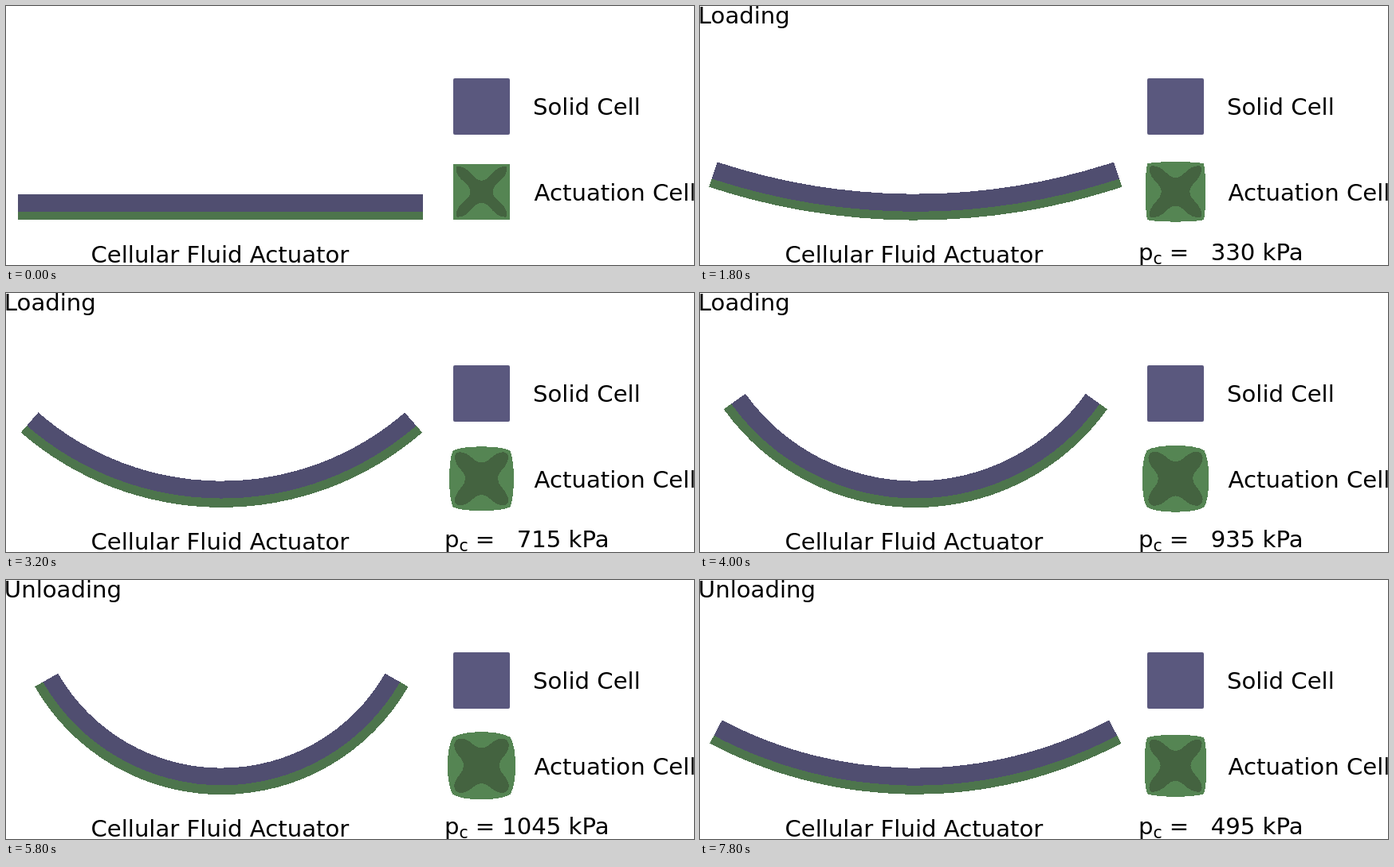
Write an HTML page that moves like this. It is 863 px wide and 326 px high and loops after 8000 ms.

```html
<!DOCTYPE html>
<html lang="en">
<head>
<meta charset="utf-8">
<title>Cellular Fluid Actuator</title>
<style>
  html, body { margin: 0; width: 100%; height: 100%; overflow: hidden; background: #fff; }
  svg { display: block; width: 863px; height: 326px; }
  path { shape-rendering: crispEdges; }
  text { font: 29.17px "DejaVu Sans", sans-serif; fill: #000; white-space: pre; }
  .sub { font-size: 20.4px; }
</style>
</head>
<body>
<svg viewBox="0 0 863 326">
  <path id="lower" fill="#4d754c"/>
  <path id="upper" fill="#504e70"/>
  <rect x="561" y="91" width="71" height="71" rx="2" fill="#5a587e"/>
  <g transform="translate(596.5 233.8)">
    <path id="cell" fill="#558553"/>
    <path id="cavity" fill="#446340"/>
  </g>
  <text id="phase" x="-2.2" y="22"></text>
  <text x="661" y="137">Solid Cell</text>
  <text x="662.6" y="245">Actuation Cell</text>
  <text x="106.4" y="322.5">Cellular Fluid Actuator</text>
  <g id="gauge">
    <text x="550" y="320">p</text>
    <text class="sub" x="568.5" y="325">c</text>
    <text x="588.8" y="320">=</text>
    <text id="value" x="696.4" y="320" text-anchor="end"></text>
    <text x="705.6" y="320">kPa</text>
  </g>
</svg>
<script>
const LOOP = 8000, STEP = 200, RISE = 55, PEAK = 1170;
const START = 600, TOP = 5000, RELEASE = 5400;
const TOP_Y = 236.6;

// pressure in kPa, half angle of the arc, half length of its inner edge
const BEND = [
  [0, 0, 254], [330, 0.3205, 253.1], [495, 0.4865, 252.5], [715, 0.7171, 250.8],
  [825, 0.8332, 249.8], [935, 0.9502, 249.2], [1170, 1.1663, 247.5]
];

const el = id => document.getElementById(id);
const draw = (id, d) => el(id).setAttribute('d', d);
const pt = (x, y) => x.toFixed(2) + ' ' + y.toFixed(2) + ' ';

function stateAt(t) {
  if (t < START) return { p: 0, phase: '', gauge: false };
  if (t < TOP) return { p: RISE * Math.floor((t - START) / STEP), phase: 'Loading', gauge: true };
  if (t < RELEASE) return { p: PEAK, phase: '', gauge: true };
  return { p: 1155 - RISE * Math.floor((t - RELEASE) / STEP), phase: 'Unloading', gauge: true };
}

function bendAt(p) {
  const i = Math.max(1, BEND.findIndex(row => row[0] >= p));
  const a = BEND[i - 1], b = BEND[i], u = (p - a[0]) / (b[0] - a[0]);
  return [1, 2].map(k => a[k] + (b[k] - a[k]) * u);
}

// layer of the beam between two depths below its top edge
function layer(p, from, to) {
  const [angle, half] = bendAt(p);
  const cx = 269 + 1.35 * Math.min(1, p / 330);
  if (!angle) {
    return `M${pt(cx - half, TOP_Y + from)}H${cx + half}V${TOP_Y + to}H${cx - half}Z`;
  }
  const r = half / angle, cy = TOP_Y - r;
  const end = (radius, side) =>
    pt(cx + side * radius * Math.sin(angle), cy + radius * Math.cos(angle));
  const arc = (radius, sweep) => `A${pt(radius, radius)}0 0 ${sweep} `;
  const a = r + from, b = r + to;
  return `M${end(a, -1)}${arc(a, 0)}${end(a, 1)}L${end(b, 1)}${arc(b, 1)}${end(b, -1)}Z`;
}

// closed path from the curves of one side, repeated around the centre
function fourSides(start, curves) {
  let d = 'M' + pt(...start);
  for (let k = 0; k < 4; k++) {
    for (const c of curves) {
      d += 'C';
      for (let i = 0; i < 6; i += 2) {
        let x = c[i], y = c[i + 1];
        for (let n = 0; n < k; n++) [x, y] = [-y, x];
        d += pt(x, y);
      }
    }
  }
  return d + 'Z';
}

function cellPath(u) {
  const h = 35.2 + 0.8 * u, top = h + 9.9 * Math.pow(u, 0.9);
  return fourSides([-h, -h], [[-h + 13, -top, h - 13, -top, h, -h]]);
}

function cavityPath(u) {
  const e = 32 + 2.6 * u;
  const r = 2.6 + 6.9 * Math.pow(u, 1.2);
  const v = 14 + 9 * Math.pow(u, 0.7);
  const a = e - r, m = 14 - u, q = 11 - u, k = e - r * 0.42;
  return fourSides([-a, -e], [
    [-m, -e + 0.8, -q, -v, 0, -v],
    [q, -v, m, -e + 0.8, a, -e],
    [k, -e, e, -k, e, -a]
  ]);
}

let shown = '';
function render(t) {
  const { p, phase, gauge } = stateAt(t);
  const key = p + phase + gauge;
  if (key === shown) return;
  shown = key;
  const u = p / PEAK, seam = 22.3 - 0.6 * u;
  draw('lower', layer(p, seam - 0.5, 32.7 + 0.9 * u));
  draw('upper', layer(p, 0, seam));
  draw('cell', cellPath(u));
  draw('cavity', cavityPath(u));
  el('phase').textContent = phase;
  el('value').textContent = p;
  el('gauge').setAttribute('visibility', gauge ? 'visible' : 'hidden');
}

const t0 = performance.now();
function tick() {
  render((performance.now() - t0) % LOOP);
  requestAnimationFrame(tick);
}
tick();
</script>
</body>
</html>
```
